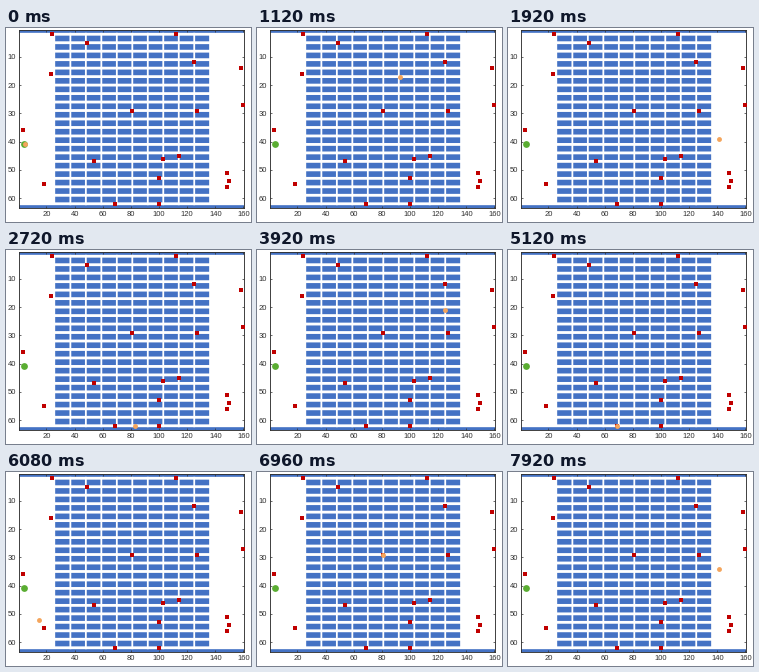
Write a matplotlib script that moves like this. It is 245 by 194 pixels and loops after 8 s.

```python
import matplotlib.pyplot as plt
from matplotlib.animation import FuncAnimation

WIDTH, HEIGHT, DPI = 245, 194, 100
FRAMES, INTERVAL = 100, 80
CELLS_PER_FRAME = 10
COLUMNS, ROWS = 160, 63
BLUE, RED, GREEN, ORANGE, INK = "#4472c4", "#c00000", "#5aad32", "#f4a55c", "#303030"

RACK_LEFT, RACK_RIGHT, RACK_WIDTH = 26, 136, 11
HOME = (4, 41)
STOPS = dict(zip("ABCDEFGHIJKLMNOPQRST", [
    (24, 2), (49, 5), (112, 2), (125, 12), (158, 14), (160, 27), (23, 16),
    (3, 36), (81, 29), (127, 29), (54, 47), (103, 46), (114, 45), (100, 53),
    (148, 51), (150, 54), (148, 56), (18, 55), (69, 62), (100, 62)]))

# Order of visits, "." is home; a repeated letter is a pause of one step.
VISITS = ".RKICDOPQQTSSLCDJOPQQQQTSKH.RSSICDJJ"
LAST_CELL = (141, 34)


def is_free(x, y):
    if not (1 <= x <= COLUMNS and 2 <= y < ROWS):
        return False
    in_block = RACK_LEFT < x < RACK_RIGHT
    return not in_block or (x - RACK_LEFT) % RACK_WIDTH == 0 or y % 3 == 2


def neighbours(cell):
    x, y = cell
    around = [(x + 1, y), (x - 1, y), (x, y - 1), (x, y + 1)]
    return [c for c in around if is_free(*c)]


def distances_to(goal):
    """Walking distance to the goal from every free cell."""
    distance, queue = {goal: 0}, [goal]
    for cell in queue:
        for nearby in neighbours(cell):
            if nearby not in distance:
                distance[nearby] = distance[cell] + 1
                queue.append(nearby)
    return distance


def walk(start, goal):
    """Shortest walk that stays close to the straight line to the goal."""
    if start == goal:
        return [goal]
    distance = distances_to(goal)
    dx, dy = goal[0] - start[0], goal[1] - start[1]

    def off_line(cell):
        return abs((cell[0] - start[0]) * dy - (cell[1] - start[1]) * dx)

    cells, cell = [], start
    while cell != goal:
        closer = [c for c in neighbours(cell) if distance[c] < distance[cell]]
        cell = min(closer, key=off_line)
        cells.append(cell)
    return cells


def plan_route():
    places = [STOPS.get(name, HOME) for name in VISITS] + [LAST_CELL]
    route = [HOME]
    for start, goal in zip(places, places[1:]):
        route += walk(start, goal)
    return route


def px(size):
    """Pixels to points."""
    return size * 72 / DPI


def draw_axes(fig):
    left, right, top, bottom = 13, 238.2, 2, 180
    ax = fig.add_axes([left / WIDTH, 1 - bottom / HEIGHT,
                       (right - left) / WIDTH, (bottom - top) / HEIGHT])
    ax.set(xlim=(0.5, COLUMNS + 0.5), ylim=(ROWS + 0.5, 0.5),
           xticks=range(20, COLUMNS + 1, 20), yticks=range(10, ROWS, 10))
    ax.tick_params(direction="in", top=True, right=True, length=px(2), width=px(0.7),
                   color=INK, labelcolor=INK, labelsize=px(7.7), pad=px(3))
    for label in ax.get_xticklabels() + ax.get_yticklabels():
        label.set_fontname("Liberation Sans")
    for spine in ax.spines.values():
        spine.set(linewidth=px(0.9), color=INK)
    return ax


def draw_racks(ax):
    for wall in (1, ROWS):
        ax.axhspan(wall - 0.5, wall + 0.5, color=BLUE, linewidth=0, snap=False)
    span = [(RACK_LEFT + 0.2, RACK_RIGHT - RACK_LEFT - 0.6)]
    for y in range(3, ROWS - 1, 3):
        ax.broken_barh(span, (y - 0.5, 2), facecolor=BLUE, linewidth=0, snap=False)
    aisles = range(RACK_LEFT + RACK_WIDTH, RACK_RIGHT, RACK_WIDTH)
    ax.vlines(aisles, 1.5, ROWS - 0.5, color="white", linewidth=px(1.8), snap=False)


def markers(ax, cells, shape, size, color, zorder):
    return ax.plot(*zip(*cells), shape, markersize=px(size), color=color,
                   markeredgewidth=0, clip_on=False, zorder=zorder)[0]


ROUTE = plan_route()

fig = plt.figure(figsize=(WIDTH / DPI, HEIGHT / DPI), dpi=DPI, facecolor="white")
ax = draw_axes(fig)
draw_racks(ax)
markers(ax, STOPS.values(), "s", 4.6, RED, 3)
markers(ax, [HOME], "o", 6.8, GREEN, 4)
robot = markers(ax, [HOME], "o", 4.9, ORANGE, 5)


def update(frame):
    step = min(1 + CELLS_PER_FRAME * frame, len(ROUTE) - 1)
    x, y = ROUTE[step]
    robot.set_data([x], [y])
    return (robot,)


animation = FuncAnimation(fig, update, frames=FRAMES, interval=INTERVAL,
                          repeat=True, repeat_delay=0)
plt.show()
```
